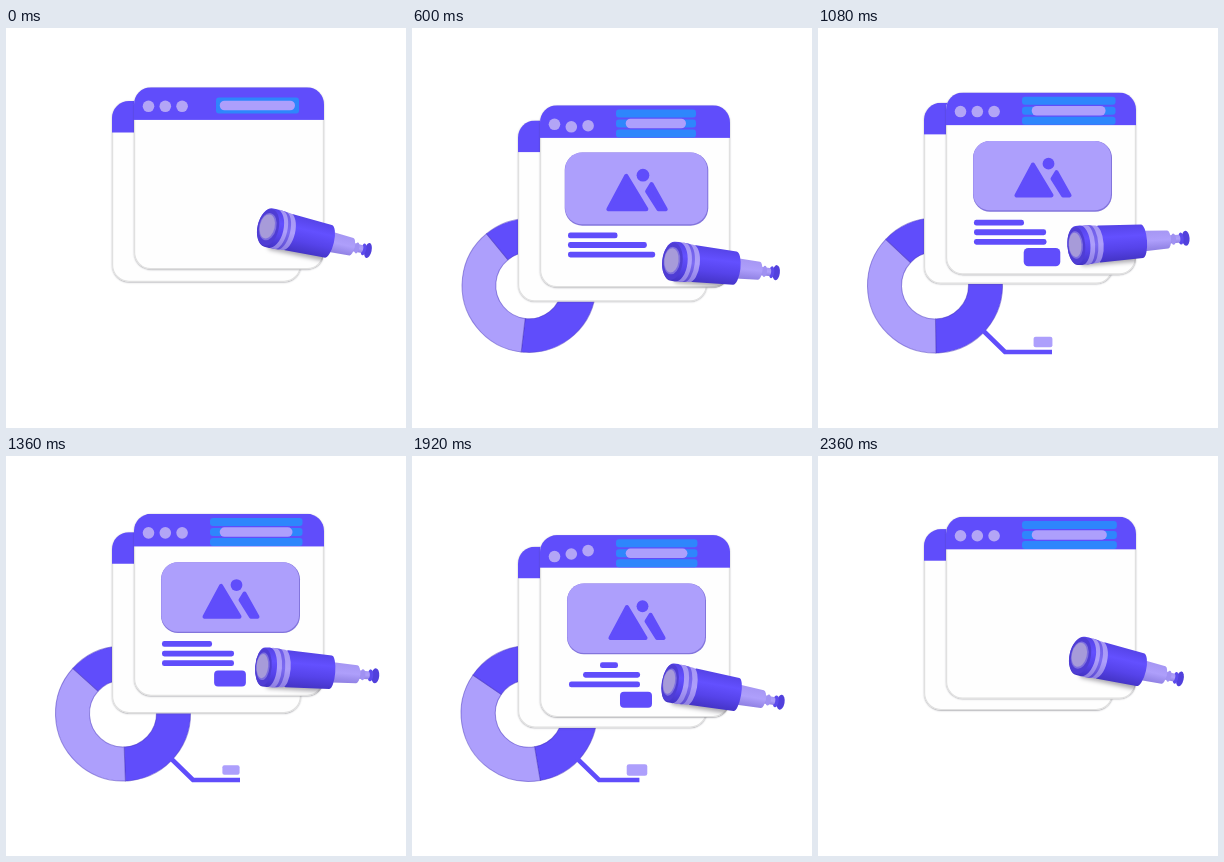
An HTML page with a canvas for the animation above (2.4 s loop, 400 px wide and 400 px high).

```html
<!DOCTYPE html>
<html lang="en">
<head>
<meta charset="utf-8">
<title>Page explorer</title>
<style>
html, body { margin: 0; width: 100%; height: 100%; overflow: hidden; background: #fff; }
canvas { display: block; width: 400px; height: 400px; }
</style>
</head>
<body>
<canvas id="stage" width="400" height="400"></canvas>
<script>
const LOOP = 2400, STEP = 40, TAU = Math.PI * 2;
const DARK = '#604dfb', LIGHT = '#ad9ffc', BLUE = '#2e86fc', DOT = '#b3a5f6';
const canvas = document.getElementById('stage');
const ctx = canvas.getContext('2d');
const ratio = Math.min(3, window.devicePixelRatio || 1);
canvas.width = canvas.height = 400 * ratio;

const clamp = v => Math.max(0, Math.min(1, v));
const lerp = (a, b, p) => a + (b - a) * p;
const wave = (t, mid, amp, peak) => mid + amp * Math.cos((t - peak) / 1200 * TAU);

// Damped spring from 0 to 1
function spring(t, start, damp = 7.2) {
  const s = (t - start) / 1000;
  return s <= 0 ? 0 : 1 - Math.exp(-damp * s) * Math.cos(14 * s);
}

// Swells a little, then shrinks from 1 to 0
function shrink(t, start, time, back = 2) {
  const p = clamp((t - start) / time);
  return 1 + back * p * p - (back + 1) * p * p * p;
}

function key(t, rows) {
  let i = 1;
  while (i < rows.length - 1 && t > rows[i][0]) i++;
  const [t0, a] = rows[i - 1], [t1, b] = rows[i];
  const p = clamp((t - t0) / (t1 - t0));
  return lerp(a, b, p * p * (3 - 2 * p));
}

function box(x, y, w, h, r, fill) {
  if (w <= 0 || h <= 0) return;
  ctx.beginPath();
  ctx.roundRect(x, y, w, h, Math.min(r, w / 2, h / 2));
  ctx.fillStyle = fill;
  ctx.fill();
}

function oval(x, y, rx, ry, fill) {
  ctx.beginPath();
  ctx.ellipse(x, y, rx, ry, 0, 0, TAU);
  ctx.fillStyle = fill;
  ctx.fill();
}

function shape(points, fill, round) {
  ctx.beginPath();
  points.forEach(([x, y]) => ctx.lineTo(x, y));
  ctx.closePath();
  ctx.lineJoin = 'round';
  ctx.lineWidth = round;
  ctx.fillStyle = ctx.strokeStyle = fill;
  ctx.fill();
  ctx.stroke();
}

function scaled(x, y, k, draw) {
  if (k <= 0.005) return;
  ctx.save();
  ctx.translate(x, y);
  ctx.scale(k, k);
  draw();
  ctx.restore();
}

function ring(t) {
  const k = spring(t, 100, 9) * shrink(t, 1900, 330);
  const turn = key(t, [[80, -170], [400, -19], [720, -1], [1360, 2], [1640, 3], [1920, 9.5], [2240, 120]]);
  scaled(117, 257.5, k, () => {
    ctx.rotate(-turn * Math.PI / 180);
    // Degrees clockwise from the right
    [[-4, 90, DARK], [90, 224, LIGHT], [224, 356, DARK]].forEach(([from, to, fill]) => {
      const a = from * Math.PI / 180, b = to * Math.PI / 180;
      ctx.beginPath();
      ctx.arc(0, 0, 67.5, a, b);
      ctx.arc(0, 0, 33.5, b, a, true);
      ctx.closePath();
      ctx.fillStyle = fill;
      ctx.fill();
      ctx.strokeStyle = 'rgba(70,52,190,.5)';
      ctx.lineWidth = 1;
      ctx.stroke();
    });
  });
}

function callout(t) {
  const p = clamp((t - 725) / 250), q = clamp((t - 1840) / 270);
  const length = 78.8 * Math.min(p, 1 - q * q);
  if (length > 0.5) {
    ctx.beginPath();
    ctx.moveTo(164.5, 302);
    ctx.lineTo(187, 324);
    ctx.lineTo(234, 324);
    ctx.setLineDash([length, 200]);
    ctx.lineWidth = 4.6;
    ctx.lineJoin = 'miter';
    ctx.strokeStyle = DARK;
    ctx.stroke();
    ctx.setLineDash([]);
  }
  scaled(225, 314, spring(t, 960) * shrink(t, 1720, 560, 2.3),
    () => box(-9, -5, 18, 10, 2, LIGHT));
}

function pane(x, y, w, h, r, bar) {
  ctx.save();
  ctx.shadowColor = 'rgba(60,60,70,.45)';
  ctx.shadowBlur = 1.6 * ratio;
  ctx.shadowOffsetY = 0.6 * ratio;
  box(x, y, w, h, r, '#fefefe');
  ctx.restore();
  ctx.save();
  ctx.beginPath();
  ctx.roundRect(x, y, w, h, r);
  ctx.clip();
  ctx.lineWidth = 2.4;
  ctx.strokeStyle = '#e0e0e0';
  ctx.stroke();
  ctx.fillStyle = DARK;
  ctx.fillRect(x, y, w, bar);
  ctx.restore();
}

function hop(t, i) {
  return [200, 1640].reduce((y, start) => {
    const p = (t - start - i * 82) / 400;
    if (p <= 0 || p >= 1) return y;
    return y - Math.sin(p * TAU) * (p < 0.5 ? 3.6 : 2.6);
  }, 0);
}

function toolbar(t) {
  for (let i = 0; i < 3; i++) oval(142.5 + i * 16.8, 17.8 + hop(t, i), 5.8, 5.8, DOT);
  const right = wave(t, 291.5, 7.5, 0), open = clamp(t / 100);
  const inset = lerp(6, 0, open), gap = lerp(4, 10, open);
  for (let i = -1; i < 2; i++)
    box(204 + inset, 13 + i * gap, right - 204 - inset * 2, 8, 3, BLUE);
  box(213.7, 12.2, right - 10 - 213.7, 9.6, 4.8, LIGHT);
}

function picture(t) {
  scaled(224.5, 82.2, spring(t, 300, 9) * shrink(t, 1960, 310), () => {
    box(-69.5, -35, 139, 70.8, 17, '#8375dc');
    box(-69.2, -35, 137.7, 69.4, 16.5, LIGHT);
  });
  scaled(224.5, 87, spring(t, 470, 9) * shrink(t, 1910, 290), () => {
    shape([[-9.5, -16.2], [-26, 14.6], [9, 14.6]], DARK, 4);
    shape([[14, -8.5], [27, 14.6], [20.5, 14.6], [10, -2]], DARK, 4);
    oval(6, -17, 5.9, 5.9, DARK);
  });
}

function copy(t) {
  [50, 72, 72].forEach((full, i) => {
    const out = clamp((t - 1728 - i * 82) / 240);
    const w = full * spring(t, 255 + i * 65);
    const cut = full * out * out;
    box(156 + cut, 126 + i * 9.6, w - cut, 5.8, 2.4, DARK);
  });
  scaled(224, 163.4, spring(t, 824) * shrink(t, 1930, 300),
    () => box(-16, -8, 32, 16, 4, DARK));
}

function tube(x0, x1, h0, h1, bulge, tones) {
  const fill = ctx.createLinearGradient(0, -h0, 0, h0);
  tones.forEach((tone, i) => fill.addColorStop(i / (tones.length - 1), tone));
  ctx.beginPath();
  ctx.moveTo(x0, -h0);
  ctx.lineTo(x1, -h1);
  ctx.ellipse(x1, 0, bulge, h1, 0, -TAU / 4, TAU / 4);
  ctx.lineTo(x0, h0);
  ctx.ellipse(x0, 0, bulge, h0, 0, TAU / 4, TAU * 0.75);
  ctx.fillStyle = fill;
  ctx.fill();
}

// Moves into the telescope's own axes and returns its length factor
function place(t) {
  const tilt = key(t, [[0, 13], [430, 13], [840, -5], [1000, -5], [1360, 4.5], [1600, 10.5], [1960, 10], [2320, 13]]);
  const reach = key(t, [[0, 1], [430, 1], [840, 1.05], [1360, 1.095], [1920, 1.095], [2320, 1]]);
  ctx.translate(lerp(312.3, 313.7, (reach - 1) * 10), wave(t, 225, 14, 605));
  ctx.rotate(tilt * Math.PI / 180);
  ctx.scale(reach, 1);
  return reach;
}

function telescope(t, top) {
  const dark = ['#5543e6', '#6350ff', '#5643ea', '#4333c4'];
  const pale = ['#a596f3', '#ae9ffb', '#8e7fe2'];

  // Soft shadow, only on the page
  ctx.save();
  ctx.beginPath();
  ctx.roundRect(128, top, 190, 181.5, 17);
  ctx.clip();
  place(t);
  ctx.shadowColor = 'rgba(50,45,60,.4)';
  ctx.shadowBlur = 4 * ratio;
  ctx.shadowOffsetX = -2 * ratio;
  ctx.shadowOffsetY = 4 * ratio;
  tube(-44, 11, 17, 16, 4, dark);
  ctx.restore();

  ctx.save();
  // The lens turns away as the tube stretches
  const face = 1 - (place(t) - 1) * 3;
  tube(47, 51, 4, 4, 2, dark);
  oval(51, 0, 3.6, 7.6, '#5140dc');
  oval(46.5, 0, 2.6, 6, '#5c4aec');
  tube(36, 44, 4.2, 4, 2, pale);
  oval(39.5, 0, 2.4, 5.6, '#a091f2');
  tube(12, 34, 10.2, 9, 3.2, pale);
  tube(-30, 10, 18.5, 16.8, 6 * face, dark);
  tube(-40, -33, 19.4, 18.8, 9 * face, pale);
  tube(-42, -38, 19.6, 19.3, 9 * face, ['#6d5be6', '#7d6cf2', '#5c4bd0']);
  tube(-44, -41, 19.8, 19.5, 9 * face, pale);
  tube(-51, -47, 19.6, 19.8, 11 * face, dark);
  oval(-51.5, 0, 10.6 * face, 18.6, '#4f3dd4');
  oval(-52, -0.6, 8.6 * face, 13.8, '#7e6fde');
  oval(-52.5, -0.8, 7.4 * face, 12.2, '#a79bd9');
  ctx.restore();
}

function draw(t) {
  ctx.setTransform(ratio, 0, 0, ratio, 0, 0);
  ctx.fillStyle = '#fff';
  ctx.fillRect(0, 0, 400, 400);
  ring(t);
  callout(t);
  pane(106, wave(t, 82.7, 9.8, 600), 189, 181, 17, 31.6);
  const top = wave(t, 69.5, 10.8, 712);
  pane(128, top - 1.2, 190, 182, 17, 32.6);
  ctx.save();
  ctx.translate(0, top);
  toolbar(t);
  picture(t);
  copy(t);
  ctx.restore();
  telescope(t, top);
}

const begin = performance.now();
function tick() {
  const t = (performance.now() - begin) % LOOP;
  draw(Math.floor(t / STEP) * STEP);
  requestAnimationFrame(tick);
}
tick();
</script>
</body>
</html>
```
